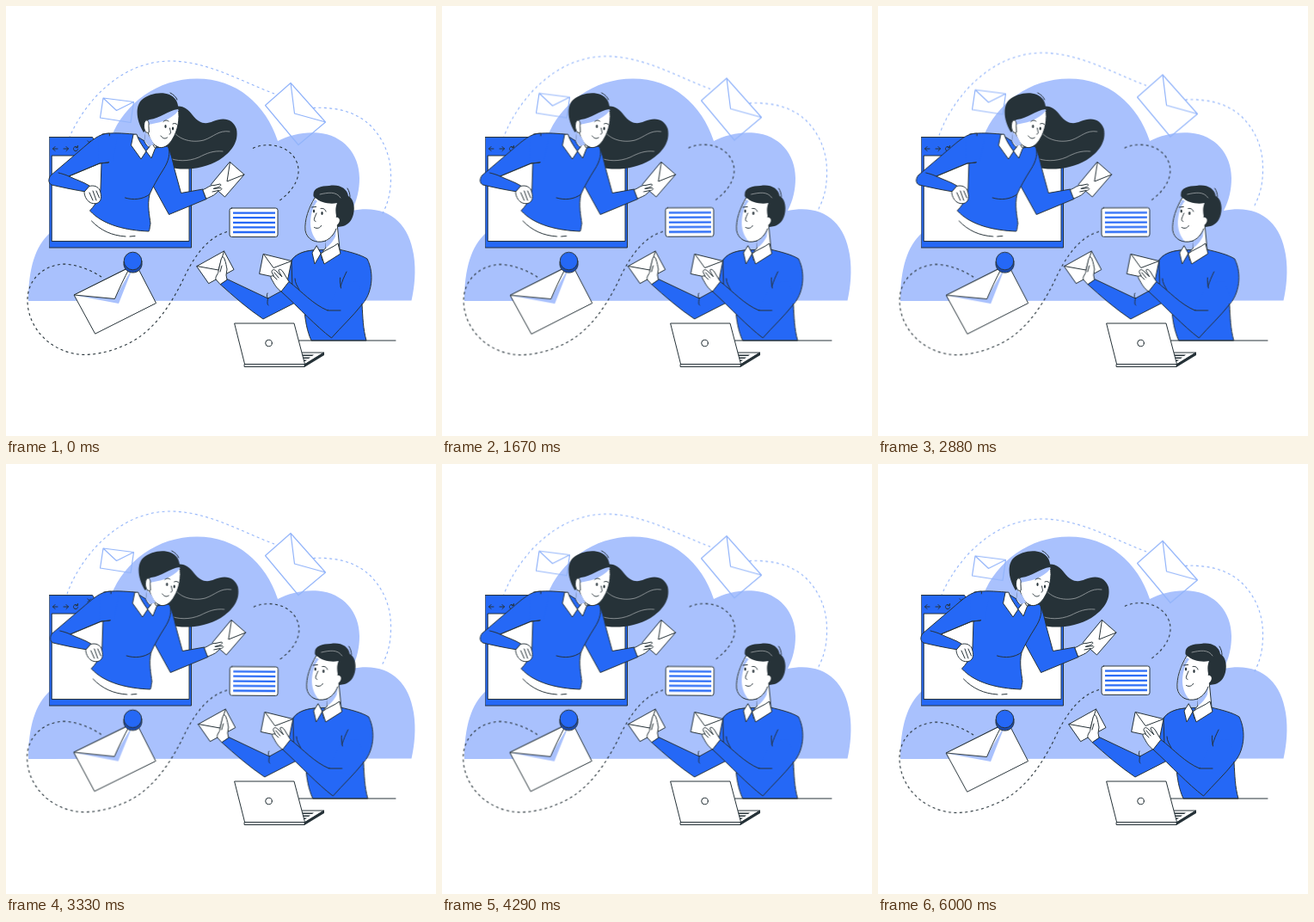
These frames come from a looping animation (500x500 px, 6040 ms). An HTML page:

```html
<!DOCTYPE html>
<html lang="en">
<head>
<meta charset="utf-8">
<title>Exchanging mail</title>
<style>
  html, body { margin: 0; width: 100%; height: 100%; overflow: hidden; background: #fff; }
  svg { display: block; width: 100vw; height: 100vh; }
  :root { --ink: #263238; --blue: #2568f6; --pale: #a9c1fd; --sky: #92b4fa; }

  .line, .paper, .cloth { stroke: var(--ink); stroke-width: 1; stroke-linejoin: round; stroke-linecap: round; }
  .line { fill: none; }
  .paper { fill: #fff; }
  .cloth { fill: var(--blue); }
  .plain { stroke: none; }
  .ink { fill: var(--ink); }
  .shade { fill: var(--pale); }
  .strand { fill: none; stroke: #a3a8aa; stroke-width: .8; stroke-linecap: round; }
  .dash { fill: none; stroke-width: 1.1; stroke-dasharray: 3 3.4; }
  .sky { fill: none; stroke: var(--sky); stroke-width: 1.2; stroke-linejoin: round; }
  .rows { stroke: var(--blue); stroke-width: 2.3; }

  .float { animation: float 6.04s linear infinite; }
  .wind { transform-origin: 183px 283px; animation: wind 3.02s linear infinite; }
  .shake { animation: shake 6.04s ease-in-out -40ms infinite; }

  @keyframes float {
    50% { transform: translateY(-10px); }
  }
  @keyframes wind {
    0%, 100% { transform: rotate(0deg); }
    25% { transform: rotate(1deg); }
    75% { transform: rotate(-1deg); }
  }
  @keyframes shake {
    0%, 100% { transform: translateX(0); }
    10%, 90% { transform: translateX(-1.5px); }
    20%, 80% { transform: translateX(3px); }
    30%, 50%, 70% { transform: translateX(-6px); }
    40%, 60% { transform: translateX(6px); }
  }
</style>
</head>
<body>
<svg viewBox="0 0 500 500">
  <!-- cloud -->
  <path class="shade" d="M26 343C26 306 34 279 51 264C75 242 108 215 122 153C138 113 176 84.500 222 84.500C268 84.500 302 114 316 157C329 150 347 146 363 147.500C392 150 411 172 411 200C411 214 408 226 402 238C442 230 468 250 474 289C477 308 475 327 471.500 342.500Z"/>

  <!-- floating trail and outlined letters -->
  <g class="float">
    <path class="dash" stroke="var(--sky)" d="M69 166C82 123 127 64 191 64C234 64 272 87 312 102M357 118.500C386 117 413 124 430 146C444 164 448 183 447.500 202C447 220 443 232 437 243"/>
    <path class="sky" d="M113 107L148.500 111.500L145 135.500L109.500 130ZM113 107L128.500 121.500L148.500 111.500"/>
    <path class="sky" d="M331 89.500L371.500 135L340 161.500L301.500 115.500ZM331 89.500L335.500 125L371.500 135"/>
  </g>

  <!-- browser window -->
  <g>
    <path class="cloth" d="M50.500 152.500H100.500L105 160H215.500V281H50.500Z"/>
    <path class="paper" d="M53.500 174H213V273.500H53.500Z"/>
    <path class="line" d="M60 166H54.500M57 163.500L54.500 166L57 168.500M67 166H72.500M70 163.500L72.500 166L70 168.500M83 164.300A2.600 2.600 0 1 0 83.600 166.700M83.500 162.500V164.700H81.300M95 156.800L98.600 160.400M98.600 156.800L95 160.400"/>
  </g>

  <!-- woman -->
  <g class="shake">
    <path class="ink" d="M193 118C204 114 211 119 217 127C225 137 232 138 241 134C253 129 264 131 268 143C271 158 262 170 248 179C233 188 213 191 198 189C187 187 184 175 187 158Z"/>
    <path class="strand" d="M193 143C198 154 214 160 230 156C242 152 247 144 260 146M188 176C198 181 212 181 224 176C234 171 241 168 252 169"/>

    <path class="cloth" d="M188 163C192 171 194 181 196 190L203.500 217.500L229 213L233 224.500L189.500 242.500L171 209L174 190Z"/>
    <path class="cloth" d="M112 149C124 147 136 148 148 149L174 165L188 163C192 170 189 181 183 190C176 201 171 210 167 219C164 232 167 244 168 253C167 258 167 261 166 262C140 261 113 255 97.500 238C106 229 110 220 110 212L111 183Z"/>
    <path class="line" d="M138.500 223C148 226 159 225 167 219"/>
    <path class="line" d="M99.500 250C110 261 123 267 139 268M144 268L150 267.500"/>

    <path class="cloth" d="M120 148C108 148 99 157 86 168L52 197C49 201 49 206 53 208C66 211 80 214 93 216L97 209C89 204 81 202 73 198L109 183L119 182Z"/>
    <path class="cloth plain" d="M107 153L130 150L124 181L108 181Z"/>
    <path class="line" d="M119 182L109 183L73 198C69 196 65 195 61 194"/>
    <path class="paper" d="M97 209.500C102 208 107 210 109 214C111 219 111 225 109 227C106 231 100 230 97 228C93 225 91 220 91 216.500Z"/>
    <path class="line" d="M97 217L101 226M101 215L105 226M105 215L108.500 223"/>

    <path class="paper" d="M163 145L161 158C164 164 170 169 175 164L174 154Z"/>
    <path class="paper" d="M148 149.500L145.500 162L157 178L163 169C158 162 154 156 152 149.500Z"/>
    <path class="paper" d="M163 169L169 177L173.500 165.500L170 160Z"/>
    <path class="paper" d="M165 131C174 130 187 119 200 119C203 131 199 146 194 154C190 162 182 167 176 163.500C170 161 167 154 165 147Z"/>
    <path class="shade" d="M165 138C176 136 191 134 201 121L196 119L165 130ZM162 147C166 149 169 155 172 161L166 163L161 157Z"/>
    <path class="ink" d="M160 147C151 133 150 116 158 109C166 102 180 99 190 103C197 106 201 113 200 120C189 121 179 131 167 132C163 133 162 138 163 144Z"/>
    <path class="line" d="M191 101C195 103 198 106 199 109"/>
    <path class="paper" d="M166 139C167 131 161 131 160.500 138C160 144 163 149 166 147Z"/>
    <ellipse class="ink" cx="185.500" cy="140" rx="1.100" ry="2"/>
    <ellipse class="ink" cx="194" cy="142.500" rx="1.100" ry="2"/>
    <path class="line" d="M183 134.500C185 132.500 187 132.500 189 134M194 137C196 136 198 136.500 199 138M190.500 142C191 146 193 148.500 190 149M180 151C182 154 185 155 187.500 153"/>

    <path class="paper" d="M260.500 181.500L277 196L254.500 222L238.500 208Z"/>
    <path class="line" d="M260.500 181.500L257 204L277 196"/>
    <path class="paper" d="M229 213.500C234 212 237 208 242 208.500L249 207C251 208 249 210 246 211L241 212.500L250 211.500C252 213 250 214 247 215L244 218C241 221 237 222 233 224Z"/>
    <path class="line" d="M240 216L247 214.500"/>
  </g>

  <!-- pinned letter, card and trail -->
  <g class="wind">
    <path class="dash" stroke="var(--ink)" d="M287 165.500C303 158 327 161 337 179C346 197 334 215 317 227M257 262.500C234 269 218 292 206 318C190 351 169 381 139 394C124 401 108 405 92 405.500C54 405 26 376 25 344C24 318 44 301 68 300C85 301 100 308 111 315"/>
    <path class="paper" d="M79.500 336L151 300L174.500 345.500L104 381Z"/>
    <path class="shade" d="M80.500 336.500L131 346L148 303L126 340Z"/>
    <path class="paper" d="M79.500 336L126.500 340.500C131 330 137 317 144 304Z"/>
    <path d="M137 297V301C139 313 156 313 158 301V297Z" fill="#1b4bb3" stroke="var(--ink)"/>
    <circle class="cloth" cx="147.500" cy="296.500" r="10.300"/>
    <rect class="paper" x="260" y="235" width="56" height="33.500" rx="2.500"/>
    <path class="rows" d="M264 240.600H313M264 246.200H313M264 251.800H313M264 257.400H313M264 263H313"/>
  </g>

  <!-- man -->
  <g class="shake">
    <path class="cloth" d="M358 284C346 285 336 289 331 297C326 309 324 321 321 331L304.500 340L257 317.500L249 323.500C264 337 281 352 299 364L340 343Z"/>
    <path class="line" d="M304.500 340C303.500 346 304 347 305 348M304.500 340C303 338 303 336 304 334"/>
    <path class="cloth" d="M357 284C345 285 336 289 332 296L333 330L347 354C348 366 350 378 355 389H419C415 375 415 362 414 347C425 335 429 312 420 294C412 289 400 286 387 283Z"/>
    <path class="cloth" d="M329 320.500C344 332 357 347 374 354L391 330L414 347C403 361 390 373 378.500 386C360 372 342 352 320 332Z"/>
    <path class="cloth plain" d="M374 353L389 322L408 320L417 343L398 361L380 357Z"/>
    <path class="line" d="M374 354H389M388.500 316C388 320 389 324 389.500 328M396 309C393 315 391 320 389 326M336 317C336 322 339 326 341 330"/>

    <path class="paper" d="M371 266L372 281L366 288L368 296L388 283L385 252Z"/>
    <path class="shade" d="M371 274C377 271 381 266 384 259L383 268C380 274 376 279 372 281Z"/>
    <path class="paper" d="M361 279L356 287L359 300L366 288Z"/>
    <path class="paper" d="M366 288L370 300L389 288L386 276C380 281 372 283 366 288Z"/>

    <path class="paper plain" d="M359 223C352 235 347 248 348 261C350 272 360 276 370 273.500C379 271 383 262 385 252L387 240L384 226Z"/>
    <path class="shade" d="M359 225C352 236 348 248 348.500 260C350 269 356 274 363 274.500C356 268 353.500 258 354 250C355 240 357 233 362 227Z"/>
    <path class="line" d="M359 223C352 235 347 248 348 261C350 272 360 276 370 273.500C377 271 381 266 384 259"/>
    <path class="ink" d="M357.500 219C357 212 366 209 376 209C387 207 397 212 398 221C404 224 406 233 404 242C402 250 398 254 392 256L386 257C385 253 383 249 384 244C383 239 383 234 385 229C376 231 365 228 361 224C358 223 357 221 357.500 219Z"/>
    <path class="strand" d="M365 219C374 217 384 215 389 223"/>
    <path class="line" d="M397 212C399 215 400 219 400 222"/>
    <path class="paper plain" d="M382 247C385 244 389 247 387.500 251C386 255 383 256 382 253Z"/>
    <ellipse class="ink" cx="358" cy="238.500" rx="1.100" ry="1.900"/>
    <ellipse class="ink" cx="367.500" cy="241" rx="1.200" ry="2"/>
    <path class="line" d="M355.500 234L360.500 233.500M366 235.500C369 235 371 236 372 239M361 241C359 246 356.500 249.500 360 250.500M358.500 257.500C362 259.500 365.500 258 366.500 255.500"/>

    <path class="paper" d="M222 302.500L253.500 285L265 306.500L236 322.500Z"/>
    <path class="line" d="M222 302.500L247 307L253.500 285"/>
    <path class="paper" d="M249 323.500L244 318C243 314 247 312 247 308L250 295C251 291 253 291 254 294C256 299 256 302 257 306L256 313L257 318Z"/>
    <path class="line" d="M249 309L251 302"/>

    <path class="paper" d="M299.500 288.500L332 296.500L327.500 318.500L295 311.500Z"/>
    <path class="line" d="M299.500 288.500L311 304.500L332 296.500"/>
    <path class="paper" d="M309 309C309 306 312 306 314 308L321 315L317 308C317 305 320 306 322 309L329 320.500L320 332C314 328 312 323 309 318C307 315 308 313 311 314Z"/>
    <path class="line" d="M311 314L315 318M312 310L317 316"/>
  </g>

  <!-- desk and laptop -->
  <path class="line" d="M340 389H453"/>
  <path class="paper" d="M331 403H369.500L347 417Z"/>
  <path class="ink" d="M370 402.500V406L347 420V416.500ZM344 405.500H358L356 407H344ZM345 408.500H354L352 410H345ZM345.500 411.500H350L348 413H346Z"/>
  <path class="paper" d="M266 369H335L347.500 416.500H278Z"/>
  <path class="paper" d="M277.500 416.500H347V419.500H277.500Z"/>
  <circle class="line" cx="305.500" cy="392" r="3.800"/>
</svg>
</body>
</html>
```
